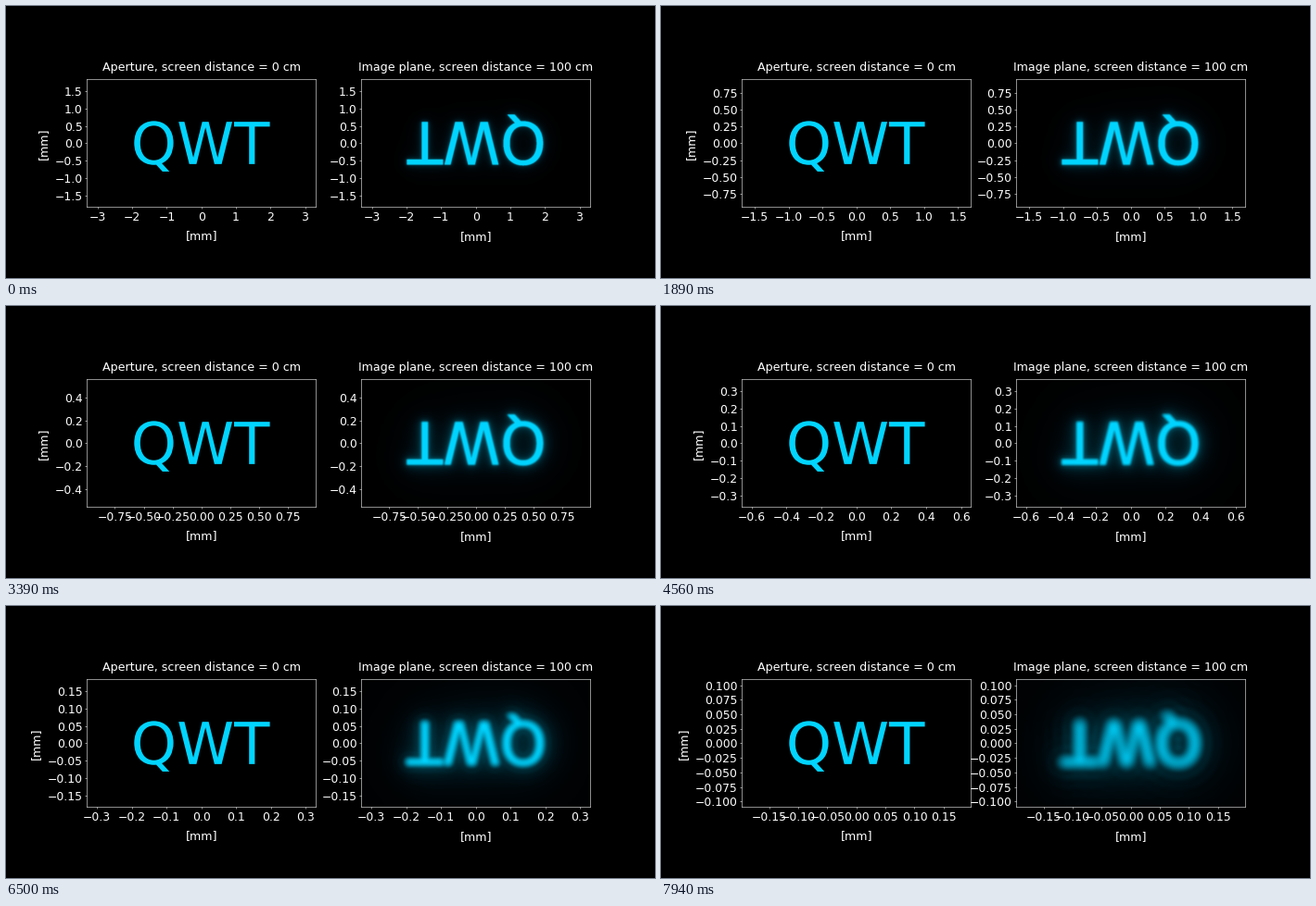
A matplotlib script for the animation above (7.99 s loop, 700 px wide and 294 px high).

```python
import numpy as np
import matplotlib.pyplot as plt
from matplotlib.animation import FuncAnimation
from matplotlib.colors import ListedColormap
from matplotlib.patches import PathPatch
from matplotlib.path import Path
from matplotlib.textpath import TextPath
from matplotlib.ticker import MaxNLocator
from matplotlib.transforms import Affine2D

STAGE_W, STAGE_H, DPI = 700, 294, 50
FRAMES, LOOP_MS = 144, 7990
AX_W, AX_H = 246.59, 138.0           # axes size in pixels
AX_BOTTOM = STAGE_H - 148.47 - AX_H / 2
START, END = 3.3, 0.1966             # half width of the view in mm
AIRY = 2.42                          # Airy radius in px at 1 mm half width
GAIN = 1.25                          # exposure of the screen
CYAN = np.array([0, 212, 255]) / 255
GRID_W, GRID_H = 320, 200            # simulated area in pixels

plt.style.use("dark_background")
plt.rcParams["font.family"] = "DejaVu Sans"


def letters():
    """Aperture outline in pixels, relative to the axes centre."""
    path = TextPath((0, 0), "QWT", size=62.7)
    box = path.get_extents()
    shift = 0.7 - (box.x0 + box.x1) / 2
    return path.transformed(Affine2D().translate(shift, -22.4))


def rasterize(path):
    """Coverage of the path on a grid with two samples per pixel."""
    x = (np.arange(GRID_W * 4) + 0.5) / 4 - GRID_W / 2
    y = (np.arange(GRID_H * 4) + 0.5) / 4 - GRID_H / 2
    points = np.stack(np.meshgrid(x, y), axis=-1).reshape(-1, 2)
    inside = np.zeros(len(points), bool)
    finer = path.transformed(Affine2D().scale(8))
    for poly in finer.to_polygons():
        inside ^= Path(poly / 8).contains_points(points)
    return inside.reshape(GRID_H * 2, 2, GRID_W * 2, 2).mean(axis=(1, 3))


def light_map():
    """Linear light to sRGB shades of the beam colour."""
    linear = np.where(CYAN > 0.04045, ((CYAN + 0.055) / 1.055) ** 2.4, CYAN / 12.92)
    light = np.linspace(0, 1, 4096)[:, None] * linear
    return ListedColormap(np.where(light > 0.0031308,
                                   1.055 * light ** (1 / 2.4) - 0.055,
                                   12.92 * light))


def add_panel(left, title, pad):
    ax = fig.add_axes([left / STAGE_W, AX_BOTTOM / STAGE_H,
                       AX_W / STAGE_W, AX_H / STAGE_H])
    ax.set_title(title, fontsize=18.2, pad=13.4)
    ax.set_xlabel("[mm]", fontsize=18.2, labelpad=pad)
    ax.tick_params(labelsize=17.8)
    ax.tick_params(axis="x", pad=2.8)
    for axis in (ax.xaxis, ax.yaxis):
        axis.set_major_locator(MaxNLocator(9, steps=[1, 2, 2.5, 5, 10]))
    return ax


fig = plt.figure(figsize=(STAGE_W / DPI, STAGE_H / DPI), dpi=DPI)
aperture = add_panel(87.45, "Aperture, screen distance = 0 cm", 10.2)
aperture.set_ylabel("[mm]", fontsize=18.2, labelpad=8.3)
screen = add_panel(383.41, "Image plane, screen distance = 100 cm", 11.2)

shape = letters()
to_axes = Affine2D().scale(1 / AX_W, 1 / AX_H).translate(0.5, 0.5)
aperture.add_artist(PathPatch(shape, facecolor=CYAN, linewidth=0,
                              transform=to_axes + aperture.transAxes))

# A lens turns the picture by half a turn.
spectrum = np.fft.rfft2(rasterize(shape)[::-1, ::-1])
freq = np.hypot(np.fft.fftfreq(GRID_H * 2, 0.5)[:, None],
                np.fft.rfftfreq(GRID_W * 2, 0.5))


def lens_image(half):
    """Incoherent image through a round pupil."""
    cutoff = 1.22 * half / AIRY
    v = np.minimum(freq / cutoff, 1)
    otf = 2 / np.pi * (np.arccos(v) - v * np.sqrt(1 - v * v))
    light = np.fft.irfft2(spectrum * otf, s=(GRID_H * 2, GRID_W * 2))
    return np.clip(GAIN * light, 0, 1)


rx, ry = GRID_W / AX_W / 2, GRID_H / AX_H / 2
picture = screen.imshow(lens_image(START), cmap=light_map(), vmin=0, vmax=1,
                        origin="lower", aspect="auto",
                        extent=(0.5 - rx, 0.5 + rx, 0.5 - ry, 0.5 + ry),
                        transform=screen.transAxes)


def update(i):
    half = START * (END / START) ** (i / (FRAMES - 1))
    for ax in (aperture, screen):
        ax.set_xlim(-half, half)
        ax.set_ylim(-half * AX_H / AX_W, half * AX_H / AX_W)
    picture.set_data(lens_image(half))
    return [picture]


anim = FuncAnimation(fig, update, frames=FRAMES, interval=LOOP_MS / FRAMES,
                     init_func=lambda: update(0), repeat=True, repeat_delay=0)
plt.show()
```
